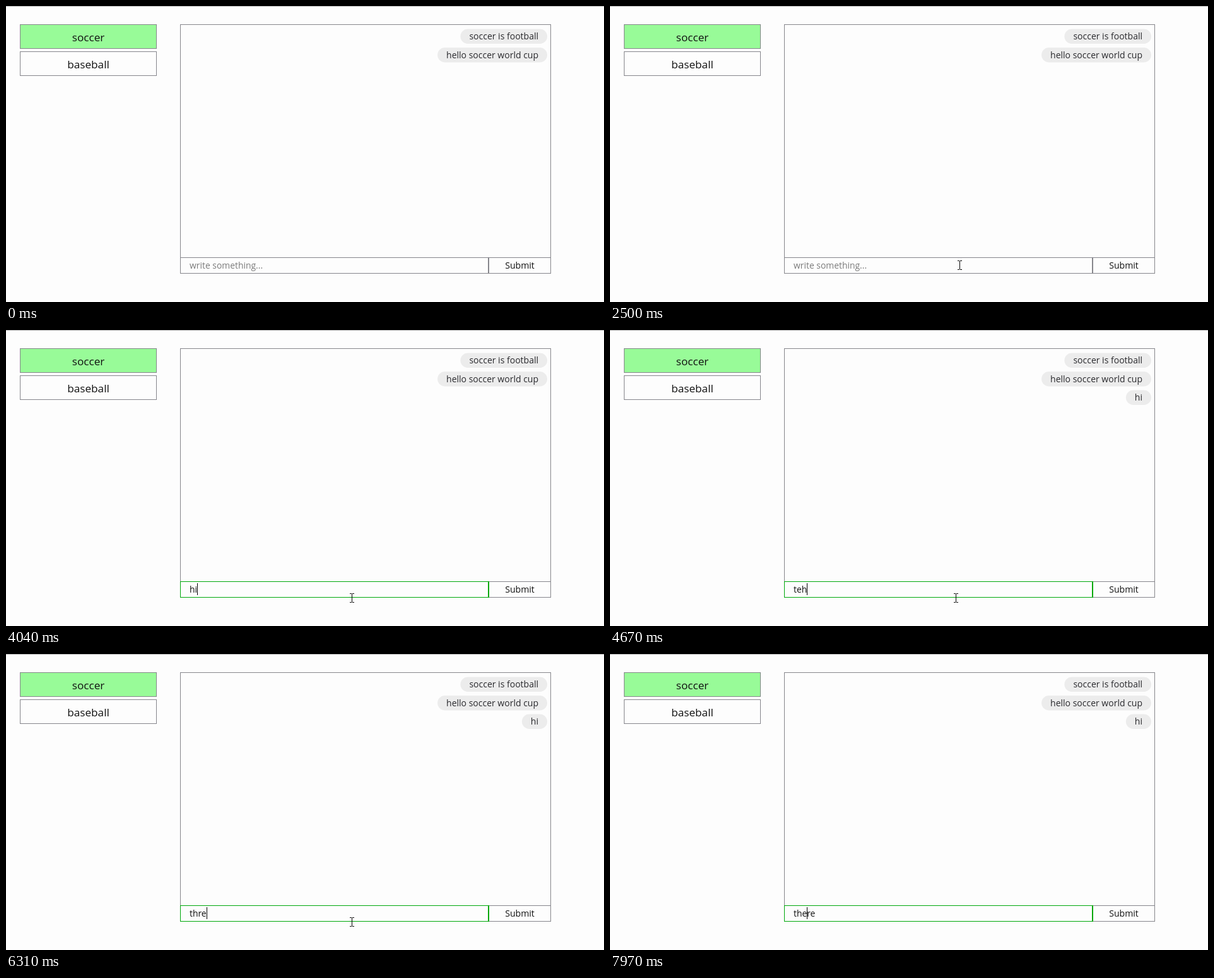
Animation of 948x470 px, one loop 8 s. Source, as an HTML page with a canvas:

```html
<!DOCTYPE html>
<html lang="en">
<head>
<meta charset="utf-8">
<title>Topic chat</title>
<style>
  html, body { margin: 0; width: 100%; height: 100%; overflow: hidden; background: #fdfdfd; }
  canvas { display: block; }
</style>
</head>
<body>
<canvas id="stage" width="948" height="470"></canvas>
<script>
const ctx = document.getElementById('stage').getContext('2d');
const LOOP = 8000;
const FONT = '"Open Sans", "Noto Sans", sans-serif';
const PAPER = '#fdfdfd', GRAY = '#86868c', GREEN = '#00a80c', INK = '#111';
const FOCUS_AT = 2800, SEND_AT = 4150, BLINK = 530;

// Each edit: time, text in the field, caret index
const edits = [
  [FOCUS_AT, '', 0], [3600, 'h', 1], [3800, 'hi', 2], [SEND_AT, '', 0],
  [4350, 't', 1], [4480, 'te', 2], [4620, 'teh', 3], [4760, 'tehr', 4],
  [5650, 'teh', 3], [5750, 'te', 2], [5850, 't', 1],
  [6000, 'th', 2], [6130, 'thr', 3], [6260, 'thre', 4],
  [6900, 'thre', 3], [7100, 'thre', 2], [7450, 'there', 3]
];

// Pointer path: time, x, y
const path = [
  [1600, 932, 442], [1740, 904, 410], [2460, 554, 411], [2700, 554, 411],
  [3000, 548, 425], [7800, 548, 425], [7930, 548, 438]
];

function text(str, x, y, size, color, align = 'left') {
  ctx.font = `${size}px ${FONT}`;
  ctx.textAlign = align;
  ctx.fillStyle = color;
  ctx.fillText(str, x, y);
}

function frame(x, y, w, h, color) {
  ctx.strokeStyle = color;
  ctx.lineWidth = 1;
  ctx.strokeRect(x + 0.5, y + 0.5, w - 1, h - 1);
}

function topic(label, y, fill) {
  ctx.fillStyle = fill;
  ctx.fillRect(22, y, 217, 39);
  frame(22, y, 217, 39, GRAY);
  text(label, 130.5, y + 26.5, 17.2, INK, 'center');
}

function bubble(label, row) {
  const y = 36.5 + row * 29.5;
  ctx.font = `14px ${FONT}`;
  const w = ctx.measureText(label).width + 28;
  ctx.fillStyle = '#ececec';
  ctx.beginPath();
  ctx.roundRect(858 - w, y, w, 23.5, 11.75);
  ctx.fill();
  text(label, 844, Math.round(y + 16.6), 14, '#2a2a2e', 'right');
}

function field(t) {
  const edit = edits.findLast(e => e[0] <= t);
  const border = edit ? GREEN : GRAY;
  frame(276, 399, 490, 26, border);
  ctx.fillStyle = border;
  ctx.fillRect(764, 399, 2, 26);

  const value = edit ? edit[1] : '';
  if (value) text(value, 291, 417, 13.9, INK);
  else text('write something...', 291, 417, 13.9, '#7b7b7b');

  if (edit && Math.floor((t - edit[0]) / BLINK) % 2 === 0) {
    ctx.font = `13.9px ${FONT}`;
    const x = 291 + ctx.measureText(value.slice(0, edit[2])).width;
    ctx.fillStyle = '#000';
    ctx.fillRect(Math.round(x), 402, 1, 19);
  }
}

function pointerAt(t) {
  const i = path.findIndex(p => p[0] > t);
  if (i < 1) return null;
  const [t0, x0, y0] = path[i - 1], [t1, x1, y1] = path[i];
  const u = (t - t0) / (t1 - t0);
  const k = u * u * (3 - 2 * u);
  return [Math.round(x0 + (x1 - x0) * k), Math.round(y0 + (y1 - y0) * k)];
}

function beam(x, y) {
  ctx.fillStyle = '#000';
  ctx.fillRect(x, y - 6, 1, 13);
  for (const dy of [-7, 7]) {
    ctx.fillRect(x - 3, y + dy, 3, 1);
    ctx.fillRect(x + 1, y + dy, 3, 1);
  }
}

function arrow(x, y) {
  ctx.beginPath();
  [[0, 0], [0, 17], [4, 13], [7, 19], [9, 18], [6.5, 12], [12, 12]]
    .forEach(([dx, dy]) => ctx.lineTo(x + dx + 0.5, y + dy + 0.5));
  ctx.closePath();
  ctx.fillStyle = '#fff';
  ctx.fill();
  ctx.strokeStyle = '#000';
  ctx.lineWidth = 1;
  ctx.stroke();
}

function draw(t) {
  ctx.fillStyle = PAPER;
  ctx.fillRect(0, 0, 948, 470);
  ctx.fillStyle = '#b5b5b5';
  ctx.fillRect(0, 0, 948, 1);

  topic('soccer', 29, '#98fb98');
  topic('baseball', 72, PAPER);

  frame(276, 29, 588, 396, GRAY);
  const messages = ['soccer is football', 'hello soccer world cup'];
  if (t >= SEND_AT) messages.push('hi');
  messages.forEach(bubble);

  frame(765, 399, 99, 26, GRAY);
  text('Submit', 814.5, 417, 14.1, INK, 'center');
  field(t);

  const pos = pointerAt(t);
  if (pos) {
    const [x, y] = pos;
    const overField = x >= 276 && x < 766 && y >= 399 && y <= 425;
    (overField ? beam : arrow)(x, y);
  }
}

const start = performance.now();
function tick() {
  draw((performance.now() - start) % LOOP);
  requestAnimationFrame(tick);
}
tick();
</script>
</body>
</html>
```
